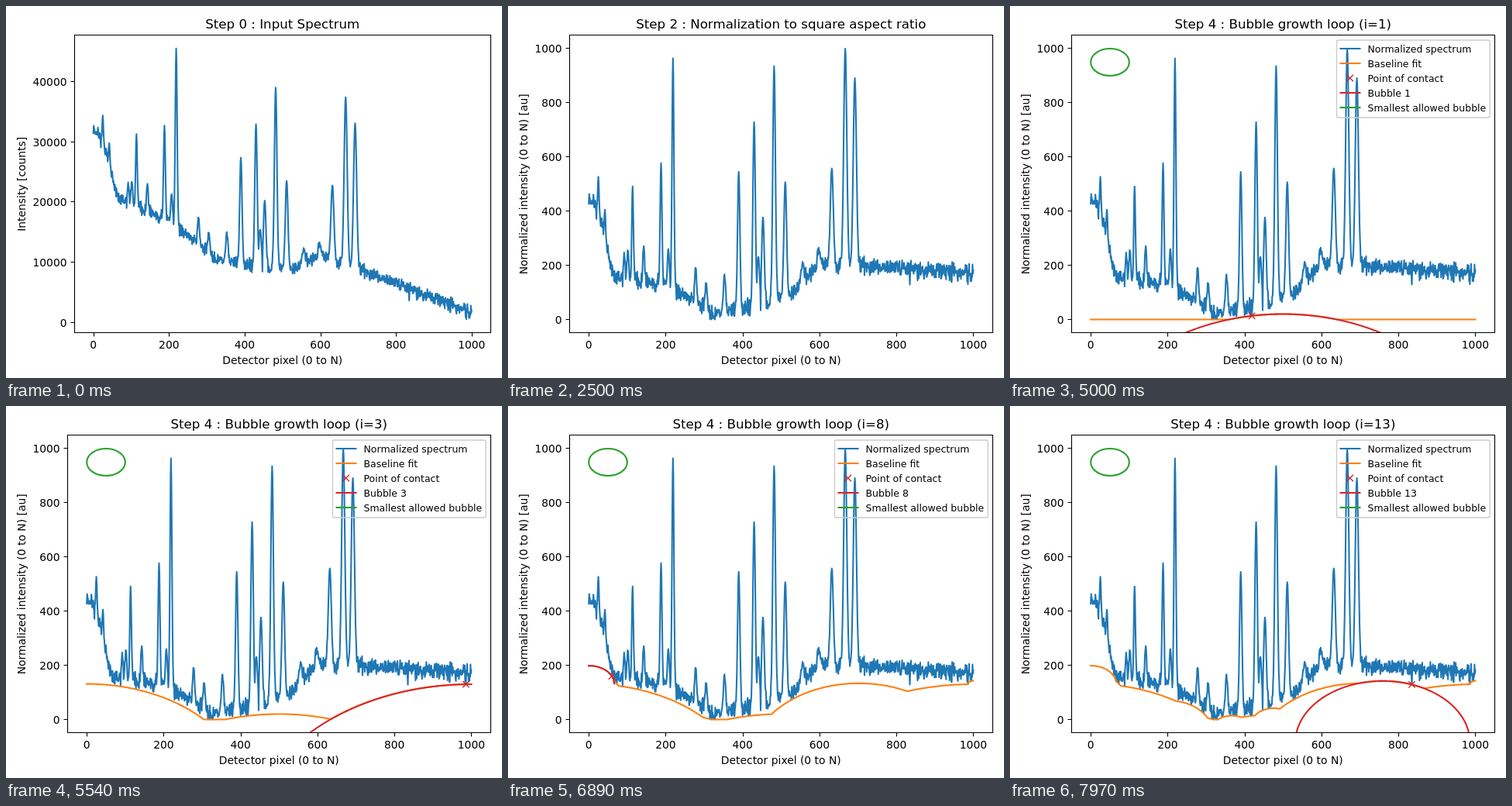
Write an HTML page that moves like this. It is 640x480 px and loops after 8000 ms.

```html
<!DOCTYPE html>
<html lang="en">
<head>
<meta charset="utf-8">
<title>Bubble baseline</title>
<style>
html, body { margin: 0; width: 100%; height: 100%; overflow: hidden; background: #fff; }
svg { display: block; width: 640px; height: 480px; font: 13.89px "DejaVu Sans", sans-serif; }
.line { fill: none; stroke-width: 2.08; stroke-linejoin: round; stroke-linecap: square; }
.axis { fill: none; stroke: #000; stroke-width: 1.11; }
.mark { fill: none; stroke: #d62728; stroke-width: 1.39; }
.title { font-size: 16.67px; }
.legend { font-size: 12.5px; white-space: pre; }
.mid { text-anchor: middle; }
.end { text-anchor: end; }
.it { font-style: italic; }
.sub { font-size: 8.75px; }
</style>
</head>
<body>
<svg id="stage" viewBox="0 0 640 480"></svg>
<script>
const BLUE = '#1f77b4', ORANGE = '#ff7f0e', GREEN = '#2ca02c', RED = '#d62728';
const LOOP = 8000, INTRO = 1250, GROWTH = 270, N = 1000;
const TOP = 37.5, BOTTOM = 421.5, RIGHT = 625.2;
const xs = Array.from({ length: N + 1 }, (_, i) => i);

// Key points [x, height] of the spectrum
const background = [[0, 445], [18, 420], [35, 345], [52, 230], [68, 157], [200, 128],
  [320, 26], [420, 40], [530, 98], [600, 200], [700, 200], [1000, 172]];
const peaks = [[25, 528], [42, 400], [92, 242], [102, 258], [114, 490], [143, 270],
  [188, 575], [207, 262], [219, 965], [278, 190], [305, 135], [353, 165], [390, 545],
  [430, 728], [441, 230], [453, 380], [482, 935], [511, 510], [556, 205], [598, 260],
  [632, 560], [667, 1000], [692, 890]];
const dips = [[60, 160], [66, 141], [88, 122], [294, 22], [315, 1.5], [328, 0], [378, 13],
  [419, 13.4], [447, 34], [532, 76.5], [835, 129], [986, 130], [993, 141]];

// Bubbles grow breadth first: each one rises until it meets a dip, which splits its region
function growBubbles() {
  const found = [], queue = [[0, N]];
  for (let id = 1; id <= queue.length; id++) {
    const [from, to] = queue[id - 1];
    const atEdge = (from === 0) !== (to === N);
    const r = atEdge ? to - from : (to - from) / 2;
    const cx = !atEdge ? (from + to) / 2 : from === 0 ? 0 : N;
    const arc = x => Math.sqrt(Math.max(0, r * r - (x - cx) ** 2));
    const inside = dips.filter(([x]) => x > from && x < to);
    if (!inside.length) continue;
    const [contact, height] = inside.reduce((a, b) => a[1] - arc(a[0]) <= b[1] - arc(b[0]) ? a : b);
    const y = x => height - arc(contact) + arc(x);
    found.push({ id, from, to, contact, y });
    queue.push([from, contact], [contact, to]);
  }
  return found;
}

const bubbles = growBubbles().slice(0, Math.ceil((LOOP - 4 * INTRO) / GROWTH));

// Baseline after the first `count` bubbles
const baseline = count => xs.map(x => bubbles.slice(0, count).reduce(
  (top, b) => x >= b.from && x <= b.to ? Math.max(top, b.y(x)) : top, 0));

let seed = 20231;
const rand = () => (seed = (seed * 16807) % 2147483647) / 2147483647;

function backgroundAt(x) {
  const k = Math.max(1, background.findIndex(p => p[0] >= x));
  const [x0, y0] = background[k - 1], [x1, y1] = background[k];
  return y0 + (y1 - y0) * (x - x0) / (x1 - x0);
}

// Peaks broaden along the detector
function peakAt(x, base) {
  return Math.max(...peaks.map(([c, top]) =>
    (top - base) * Math.exp(-(((x - c) / (1.7 + c / 290)) ** 2) / 2)));
}

const floor = baseline(bubbles.length);
const spectrum = xs.map(x => {
  const base = backgroundAt(x), peak = peakAt(x, base);
  const noise = (rand() + rand() + rand() - 1.5) * 32 / (1 + peak / 60);
  return Math.min(N, Math.max(floor[x], base + peak + noise));
});
for (const [x, y] of dips) spectrum[x] = y;

const slope = xs.map(x => 23820 - 20850 * x / N);
const flat = spectrum.map(v => v * 34.65 - 7150);
const raw = flat.map((v, x) => v + slope[x]);

// Plot frames: left edge, y pixel of zero, pixels per unit, tick step and count
const views = {
  counts: { left: 88.3, zero: 409.1, scale: 0.007783, step: 10000, ticks: 5, label: 'Intensity [counts]' },
  slope: { left: 88.3, zero: 356.9, scale: 0.006637, step: 10000, ticks: 5, label: 'Intensity [counts]' },
  norm: { left: 79.4, zero: 404.5, scale: 0.3495, step: 200, ticks: 6, label: 'Normalized intensity (0 to N) [au]' }
};
for (const v of Object.values(views)) {
  const w = RIGHT - v.left;
  v.mid = v.left + w / 2;
  v.px = x => v.left + w * (1 / 22 + x / N / 1.1);
  v.py = y => v.zero - y * v.scale;
}

const snap = p => Math.round(p) + 0.5;
const snapY = p => Math.round(p) - 0.5;
const text = (x, y, s, cls = '') => `<text x="${x}" y="${y}" class="${cls}">${s}</text>`;
const path = (d, color) => `<path class="line" stroke="${color}" d="${d}"/>`;
const cross = (x, y) =>
  `<path class="mark" d="M${x - 4.17} ${y - 4.17}l8.34 8.34m0 -8.34l-8.34 8.34"/>`;
const frame = v => `M${snap(v.left)} ${TOP}H${snap(RIGHT)}V${BOTTOM}H${snap(v.left)}Z`;

function curve(v, ys, color, from = 0) {
  const pts = ys.map((y, i) => v.px(from + i).toFixed(2) + ' ' + v.py(y).toFixed(2));
  return path('M' + pts.join('L'), color);
}

function axes(v, title) {
  let ticks = '', labels = '';
  for (let x = 0; x <= N; x += 200) {
    ticks += `M${snap(v.px(x))} ${BOTTOM}v5`;
    labels += text(v.px(x), 442, x, 'mid');
  }
  for (let k = 0; k < v.ticks; k++) {
    const y = v.py(k * v.step);
    ticks += `M${snap(v.left)} ${snapY(y)}h-5`;
    labels += text(v.left - 9.7, Math.round(y + 5), k * v.step, 'end');
  }
  return `<path class="axis" d="${frame(v)}${ticks}"/>` + labels +
    text(v.mid, 462, 'Detector pixel (0 to N)', 'mid') +
    `<text class="mid" transform="translate(25 229.8) rotate(-90)">${v.label}</text>` +
    text(v.mid, 29, title, 'mid title');
}

function legend(left, bottom, first, gap, rows) {
  const box = `<rect x="${left}" y="44" width="${619.2 - left}" height="${bottom - 44}" rx="2.5" fill="none" stroke="#ccc" stroke-width="1.39"/>`;
  return box + rows.map(([color, label], k) => {
    const y = first + k * gap;
    const key = color ? path(`M${left + 5} ${y}h25`, color) : cross(left + 17.3, y);
    return key + text(left + 40, y + 4.5, label, 'legend');
  }).join('');
}

const clip = (v, content) =>
  `<clipPath id="plot"><path d="${frame(v)}"/></clipPath><g clip-path="url(#plot)">${content}</g>`;

const sym = s => `<tspan class="it">${s}</tspan><tspan class="sub" dy="2">0</tspan><tspan dy="-2">`;
const scene = (v, title, content, key = '') => clip(v, content) + axes(v, title) + key;

function bubbleScene(b, k) {
  const v = views.norm;
  const arc = xs.slice(b.from, b.to + 1).map(b.y);
  const ring = `<ellipse class="line" stroke="${GREEN}" cx="${v.px(50)}" cy="${v.py(950)}" rx="${v.px(50) - v.px(0)}" ry="${50 * v.scale}"/>`;
  return scene(v, `Step 4 : Bubble growth loop (i=${b.id})`,
    curve(v, spectrum, BLUE) + curve(v, baseline(k + 1), ORANGE) +
    cross(v.px(b.contact), v.py(b.y(b.contact))) + curve(v, arc, RED, b.from) + ring,
    legend(421.5, 144, 55, 19, [
      [BLUE, 'Normalized spectrum'], [ORANGE, 'Baseline fit'], [null, 'Point of contact'],
      [RED, 'Bubble ' + b.id], [GREEN, 'Smallest allowed bubble']]));
}

const scenes = [
  scene(views.counts, 'Step 0 : Input Spectrum', curve(views.counts, raw, BLUE)),
  scene(views.slope, 'Step 1 : Global slope removal',
    curve(views.slope, raw, BLUE) + curve(views.slope, slope, ORANGE) + curve(views.slope, flat, GREEN),
    legend(450.5, 114.3, 55.5, 22.5, [
      [BLUE, sym('S') + ' : Input Spectrum</tspan>'],
      [ORANGE, sym('P') + ' : linear slope fit</tspan>'],
      [GREEN, sym('S') + ' − </tspan>' + sym('P') + '</tspan>']])),
  scene(views.norm, 'Step 2 : Normalization to square aspect ratio', curve(views.norm, spectrum, BLUE)),
  scene(views.norm, 'Step 3 : Baseline initialization',
    curve(views.norm, spectrum, BLUE) + curve(views.norm, baseline(0), ORANGE),
    legend(440.5, 87, 55, 19, [[BLUE, 'Normalized spectrum'], [ORANGE, 'Baseline fit']])),
  ...bubbles.map(bubbleScene)
];

const stage = document.getElementById('stage');
const start = performance.now();
let shown = -1;

function tick() {
  const t = (performance.now() - start) % LOOP;
  const k = t < 4 * INTRO ? Math.floor(t / INTRO) : 4 + Math.floor((t - 4 * INTRO) / GROWTH);
  if (k !== shown) stage.innerHTML = scenes[shown = k];
  requestAnimationFrame(tick);
}
tick();
</script>
</body>
</html>
```
